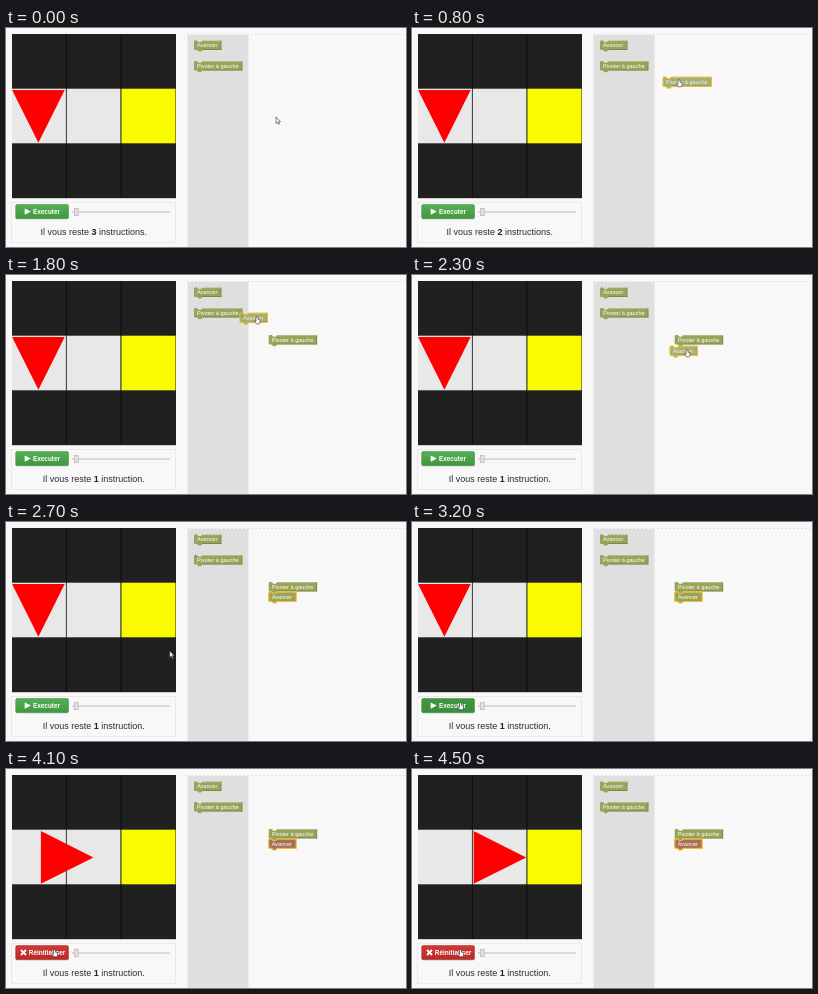
Write an HTML page with a canvas that moves like this. It is 400 px wide and 219 px high and loops after 5.1 s.

```html
<!DOCTYPE html>
<html lang="fr">
<head>
<meta charset="utf-8">
<style>
html, body { margin: 0; width: 100%; height: 100%; overflow: hidden; background: #f8f8f8; }
canvas { display: block; }
</style>
</head>
<body>
<canvas id="stage" width="400" height="219"></canvas>
<script>
const c = document.getElementById('stage').getContext('2d');
const LOOP = 5100, STEP = 100;
const FONT = '"Liberation Sans", Arial, sans-serif';
const OLIVE = '#98a45a', BROWN = '#a8705a', GOLD = '#f5bd35';

// pointer path: time, x, y
const path = [
  [0, 270, 89], [100, 268, 84], [500, 204, 38], [800, 267, 53],
  [1100, 279, 64], [1500, 205, 17], [1800, 251, 43],
  [2300, 275, 76], [2400, 279, 76], [3000, 48.5, 182], [LOOP, 48.5, 182]
];

const progress = (t, a, b) => Math.min(1, Math.max(0, (t - a) / (b - a)));
const mix = (a, b, p) => a + (b - a) * p;

function pointerAt(t) {
  const i = path.findIndex(k => k[0] > t);
  const [t0, x0, y0] = path[i - 1], [t1, x1, y1] = path[i];
  const p = progress(t, t0, t1);
  return [mix(x0, x1, p), mix(y0, y1, p)];
}

function rect(x, y, w, h, fill) {
  c.fillStyle = fill;
  c.fillRect(x, y, w, h);
}

function text(s, x, y, size, color, weight = '') {
  c.font = `${weight} ${size}px ${FONT}`;
  c.fillStyle = color;
  c.fillText(s, x, y);
  return c.measureText(s).width;
}

function shape(points, fill) {
  c.beginPath();
  points.forEach(p => c.lineTo(...p));
  c.closePath();
  c.fillStyle = fill;
  c.fill();
}

function line(x1, y1, x2, y2, color, width = 1) {
  c.beginPath();
  c.moveTo(x1, y1);
  c.lineTo(x2, y2);
  c.strokeStyle = color;
  c.lineWidth = width;
  c.stroke();
}

function block(label, x, y, { fill = OLIVE, selected = false, dragged = false } = {}) {
  const w = label === 'Avancer' ? 27.4 : 48.4, h = 9.5;
  c.save();
  c.translate(x, y);
  if (dragged) c.globalAlpha = 0.85;
  const outline = new Path2D(
    `M0 1 Q0 0 1 0 H3 L4.5 1.7 H7 L8.5 0 H${w} V${h} H8.5 L7 ${h + 1.7} H4.5 L3 ${h} H1 Q0 ${h} 0 ${h - 1} Z`);
  c.fillStyle = fill;
  c.fill(outline);
  line(8.5, h - 0.4, w, h - 0.4, 'rgba(70,80,30,.4)', 0.8);
  line(w - 0.4, 0, w - 0.4, h, 'rgba(70,80,30,.4)', 0.8);
  line(8.5, 0.4, w, 0.4, 'rgba(255,255,255,.35)', 0.8);
  if (selected) {
    c.strokeStyle = GOLD;
    c.lineWidth = 1.2;
    c.stroke(outline);
  }
  text(label, 3, 6.9, 5.55, '#fff');
  c.restore();
}

function board(t) {
  rect(6, 6, 164, 164.2, '#202020');
  rect(6, 60.7, 108.7, 54.6, '#e8e8e8');
  rect(115, 60.7, 54.5, 54.6, '#fbfb00');
  for (const x of [60.4, 115]) line(x, 6, x, 170, '#0a0a0a', 0.8);

  const turn = progress(t, 3400, 3700), move = progress(t, 3700, 4500);
  c.save();
  c.translate(mix(32.4, 34.4, turn) + 53.5 * move, 88.4);
  c.rotate(Math.PI / 2 * (1 - turn));
  shape([[-26.3, -26.3], [26.3, 0], [-26.3, 26.3]], '#ff0000');
  c.restore();
}

function controls(t) {
  c.setLineDash([1, 1]);
  c.lineWidth = 1;
  c.strokeStyle = '#dcdcdc';
  c.strokeRect(5.5, 174.5, 164, 40);
  c.setLineDash([]);

  const running = t >= 3400, hover = t >= 3000;
  const shade = c.createLinearGradient(0, 176, 0, 191);
  const [top, bottom] = running ? ['#cf3a36', '#b82b28'] : hover ? ['#439743', '#3b8b3c'] : ['#55b155', '#40963f'];
  shade.addColorStop(0, top);
  shade.addColorStop(1, bottom);
  c.beginPath();
  c.roundRect(9.7, 176.5, 52.8, 14.3, 1.5);
  c.fillStyle = shade;
  c.fill();
  c.strokeStyle = running ? '#a62b28' : '#3a873a';
  c.lineWidth = 0.5;
  c.stroke();
  if (running) {
    line(15, 181, 20, 186, '#fff', 1.8);
    line(20, 181, 15, 186, '#fff', 1.8);
    text('Réinitialiser', 22.8, 186.2, 6.45, '#fff', 'bold');
  } else {
    shape([[18.7, 180.4], [24.8, 183.6], [18.7, 186.8]], '#fff');
    text('Executer', 27, 186.2, 6.4, '#fff', 'bold');
  }

  line(66, 184, 164, 184, '#d0d0d0', 1.4);
  rect(68, 180, 4.6, 8, '#c4bcbc');
  rect(68.8, 180.8, 3, 6.4, '#e4dede');

  const left = t < 500 ? 3 : t < 1500 ? 2 : 1;
  let x = left > 1 ? 34.4 : 36.8;
  x += text('Il vous reste ', x, 206.9, 9, '#2b2b2b');
  x += text(left, x, 206.9, 9, '#222', 'bold');
  text(left > 1 ? ' instructions.' : ' instruction.', x, 206.9, 9, '#2b2b2b');
}

function workspace(t, [x, y]) {
  rect(181.5, 7, 61, 212, '#dfdfdf');
  c.setLineDash([2, 2]);
  line(181, 6.5, 400, 6.5, '#e2e2e2');
  c.setLineDash([]);
  block('Avancer', 188, 12.4);
  block('Pivoter à gauche', 188, 33.1);

  if (t >= 500) {
    const dragged = t < 1100;
    const [bx, by] = dragged ? [x - 16, y - 4] : [262.7, 60];
    block('Pivoter à gauche', bx, by, { dragged, selected: t < 1500 });
  }
  if (t >= 1500) {
    const dragged = t < 2400;
    const [bx, by] = dragged ? [x - 17, y - 5] : [262.7, 69.8];
    block('Avancer', bx, by, { dragged, selected: true, fill: t >= 3700 ? BROWN : OLIVE });
  }
}

function pointer(t, [x, y]) {
  const hand = t >= 400 && t < 1200 || t >= 1400 && t < 2500 || t >= 3000;
  const outline = new Path2D(hand
    ? 'M-1 0 Q0 -1 1 0 V2 L3 2.5 V5 L2.4 6.6 H-0.8 L-2.6 4 L-2 3.4 L-1 4.2 Z'
    : 'M0 0 V6.4 L1.5 5.1 L2.5 7.4 L3.5 6.9 L2.5 4.7 H4.5 Z');
  c.save();
  c.translate(x, y - (hand ? 0.8 : 0));
  c.fillStyle = '#fff';
  c.fill(outline);
  c.strokeStyle = '#333';
  c.lineWidth = 0.6;
  c.stroke(outline);
  c.restore();
}

function draw() {
  const t = Math.floor(performance.now() % LOOP / STEP) * STEP;
  const at = pointerAt(t);
  rect(0, 0, 400, 219, '#f8f8f8');
  board(t);
  controls(t);
  workspace(t, at);
  pointer(t, at);
  requestAnimationFrame(draw);
}
draw();
</script>
</body>
</html>
```
